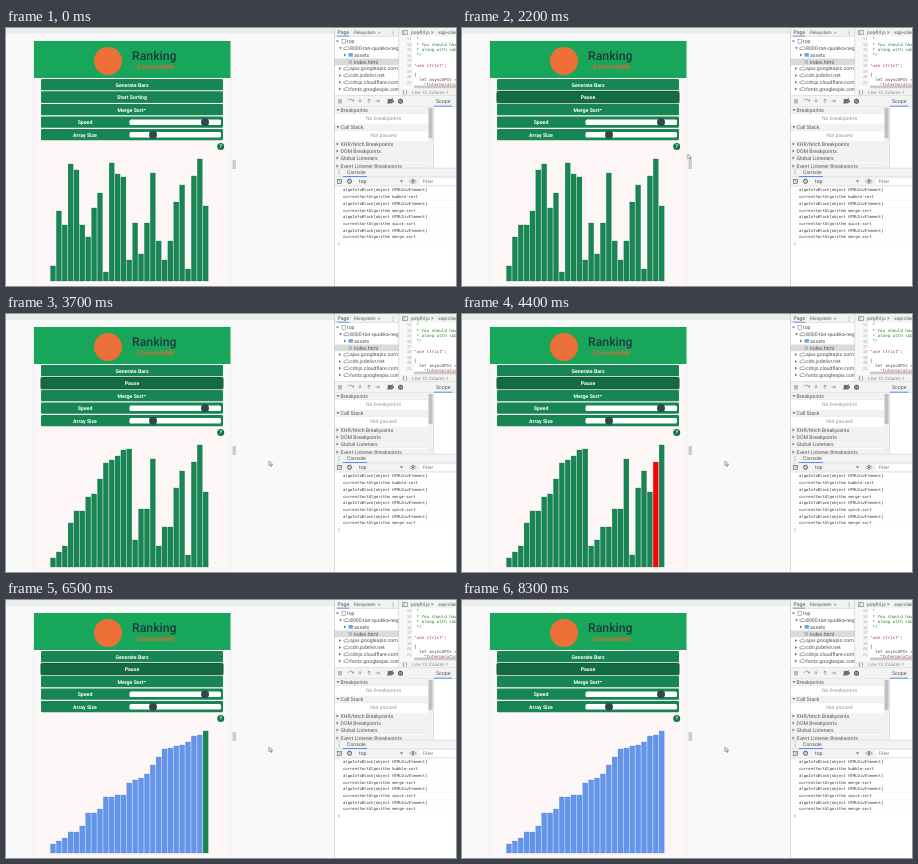
Recreate the animation shown at these times as an HTML page. Size 450 by 258 pixels, loop 8400 ms.

```html
<!DOCTYPE html>
<html lang="en">
<head>
<meta charset="utf-8">
<title>Merge sort demo</title>
<style>
  html, body { margin: 0; width: 100%; height: 100%; overflow: hidden; background: #f9f9fa; }
  svg { display: block; width: 100vw; height: 100vh; }
  text { font-family: Roboto, sans-serif; font-size: 5.2px; fill: #555; white-space: pre; text-rendering: geometricPrecision; }
  .label { font-size: 5.2px; font-weight: 700; fill: #fff; text-anchor: middle; }
  .mono { font-family: "DejaVu Sans Mono", monospace; font-size: 3.9px; fill: #333; }
  .code { font-family: "DejaVu Sans Mono", monospace; font-size: 4.2px; fill: #444; }
  .mid { text-anchor: middle; fill: #999; }
</style>
</head>
<body>
<svg id="stage" viewBox="0 0 450 258" preserveAspectRatio="none"></svg>
<script>
const stage = document.getElementById('stage');

function add(tag, attrs, content = '') {
  const node = document.createElementNS(stage.namespaceURI, tag);
  for (const key in attrs) node.setAttribute(key, attrs[key]);
  node.textContent = content;
  return stage.appendChild(node);
}
const rect = (x, y, width, height, fill, extra) => add('rect', { x, y, width, height, fill, ...extra });
const text = (x, y, content, extra) => add('text', { x, y, ...extra }, content);
const path = (d, stroke = '#777', extra) => add('path', { d, stroke, fill: 'none', 'stroke-width': 0.6, ...extra });
const circle = (cx, cy, r, fill) => add('circle', { cx, cy, r, fill });
const arrow = (x, y, open) =>
  path(open ? `M${x} ${y - 1}h3l-1.5 2.2z` : `M${x} ${y - 1.5}v3l2.2-1.5z`, 'none', { fill: '#777' });

function drawPage() {
  rect(0, 0, 328, 6, '#ececec');
  rect(27, 12.5, 198.3, 246, '#eeeeee');
  rect(28, 13, 196.5, 245, '#fcf7f6');
  rect(28, 13, 196.5, 37, '#17a65a');
  rect(226.5, 132, 3.5, 9, '#ccc');
  circle(102, 33, 14, '#ed7038');
  text(126, 32.3, 'Ranking', { style: 'font:500 12.3px Roboto,sans-serif;fill:#203a40' });
  text(130.5, 41, 'Unscramble', { style: 'font:italic 700 7.6px "Liberation Serif",serif;fill:#f0642f' });

  for (const y of [51, 63.5, 76, 88.5, 101]) rect(35, y, 182, 11.3, '#178554', { rx: 1.2 });
  text(126, 58.7, 'Generate Bars', { class: 'label' });
  text(124.5, 83.7, 'Merge Sort', { class: 'label' });
  path('M137.5 81h2.4l-1.2 1.5z', 'none', { fill: '#fff' });
  for (const [name, y, thumb] of [['Speed', 94.2, 199], ['Array Size', 106.8, 147]]) {
    text(79, y + 1.8, name, { class: 'label' });
    rect(123.5, y - 2.7, 91.5, 5.4, '#fff', { rx: 1.5 });
    circle(thumb, y, 4, '#2c4a4b');
  }
  circle(214.7, 118.5, 3.5, '#14754a');
  text(214.7, 120.4, '?', { class: 'label' });
}

function drawSources() {
  rect(328, 0, 122, 258, '#fff');
  rect(328, 0, 122, 8.5, '#f2f2f2');
  rect(328, 8.2, 122, 0.5, '#ccc');
  text(331.5, 6, 'Page');
  text(347.5, 6, 'Filesystem', { style: 'font-size:4.6px' });
  text(372, 6, '»');
  path('M387 2.5v.8m0 1v.8m0 1v.8', '#555');
  rect(331, 7.7, 12, 0.8, '#4285f4');

  rect(328, 30.5, 65, 6.7, '#dadada');
  const tree = ['top', '8000-tan-quokka-negl', 'assets', 'index.html',
    'ajax.googleapis.com', 'cdn.jsdelivr.net', 'cdnjs.cloudflare.com', 'fonts.googleapis.com'];
  tree.forEach((name, i) => {
    const y = 13.4 + i * 6.8;
    const inner = i === 2 || i === 3;
    const x = inner ? 348 : i ? 344 : 341;
    if (i !== 3) arrow(inner ? 338 : i ? 333 : 330, y, i < 2);
    if (inner) rect(x - 5.5, y - 1.9, i === 2 ? 4.4 : 3.5, i === 2 ? 3.6 : 4.2, i === 2 ? '#6ba4e8' : '#bbb');
    else if (i) path(`M${x - 6} ${y + 1.4}q-1-2.5 1.3-2.3q2-2.5 3 .3q2 .6.5 2z`);
    else rect(x - 5, y - 2, 3.6, 4, 'none', { stroke: '#777', 'stroke-width': 0.5 });
    text(x, y + 1.8, name);
  });

  rect(393, 0, 57, 67, '#fff');
  rect(393, 8.6, 14, 51, '#f7f7f7');
  rect(393, 0, 57, 8.4, '#f2f2f2');
  rect(392.5, 0, 0.6, 67, '#ccc');
  path('M396.5 2.5h5v4h-5zm1.6 0v4');
  text(405, 6, 'polyfill.js', { style: 'font-size:4.8px' });
  text(425, 6, '×');
  text(432, 6, 'vapi-client', { style: 'font-size:4.8px' });

  const code = [[12.2, ' *', 1], [17.6, ' * You should have rec', 1], [22.7, ' * along with subst', 1], [27.8, ' */', 1],
    [38.5, '"use strict";'], [47.5, '{'], [52.5, '  let asyncAPIs = ['], [57.5, '    "Interpolation']];
  for (const [y, line, comment] of code) {
    text(408, y, line, { class: 'code', style: comment ? 'fill:#347a34' : line.includes('"') ? 'fill:#a33' : '' });
  }
  for (let i = 0; i < 9; i++) {
    text(405.5, 12.2 + i * 5.45, 13 + i, { class: 'code', style: 'text-anchor:end;fill:#aaa;font-size:4px' });
  }
  rect(408, 57.5, 42, 3, '#c9c9c9');
  rect(393, 60.5, 57, 6.5, '#f3f3f3');
  text(396.5, 66, '{ }');
  text(406, 66, 'Line 13, Column 1', { style: 'font-size:4.6px;fill:#888' });
}

function drawDebugger() {
  rect(328, 67.5, 122, 11, '#f3f3f3');
  rect(328, 67.2, 122, 0.5, '#ccc');
  rect(328, 78.5, 122, 0.5, '#ccc');
  path('M333 71v4.5m2-4.5v4.5', '#777', { 'stroke-width': 0.9 });
  path('M341.5 73q3-4 6 0m0-2v2h-2M354 70.5v3.5m-1.5-1.5l1.5 1.5l1.5-1.5M363 75v-4m-1.5 1.5l1.5-1.5l1.5 1.5M369.5 73h4m-1.5-1.5l1.5 1.5l-1.5 1.5');
  path('M382 71.3h4l2 1.9l-2 1.9h-4zM381 76l6-6', '#555', { fill: '#777' });
  circle(394.5, 73.3, 2.5, '#555');
  path('M393.8 72v2.5m1.4-2.5v2.5', '#fff');
  text(430, 75.4, 'Scope');
  rect(428, 77.7, 18, 0.9, '#4285f4');

  const sections = [['Breakpoints', 82, 1], ['Call Stack', 99, 1], ['XHR/fetch Breakpoints', 116],
    ['DOM Breakpoints', 123], ['Global Listeners', 130], ['Event Listener Breakpoints', 138]];
  for (const [name, y, open] of sections) {
    rect(328, y - 3.2, 99, 6.4, '#f2f2f2');
    rect(328, y + 3.2, 99, 0.4, '#d5d5d5');
    arrow(330.5, y, open);
    text(334.5, y + 1.8, name);
  }
  text(377.5, 92, 'No breakpoints', { class: 'mid' });
  text(377.5, 109, 'Not paused', { class: 'mid' });
  rect(422, 79, 5, 61, '#f1f1f1');
  rect(422.5, 80, 4, 30, '#c1c1c1');
  rect(427, 79, 0.6, 61, '#ccc');
}

function drawConsole() {
  rect(328, 140, 122, 18, '#f3f3f3');
  for (const y of [139.8, 148.7, 157.8]) rect(328, y, 122, 0.5, '#ccc');
  path('M333 142v.9m0 1v.9m0 1v.9', '#555');
  text(341, 146.2, 'Console');
  rect(337, 148, 24, 0.9, '#4285f4');
  rect(331.5, 151.3, 4, 4, 'none', { stroke: '#555', 'stroke-width': 0.6 });
  path('M333 152.2l1.8 1.1l-1.8 1.1');
  circle(343.5, 153.3, 2, 'none').setAttribute('stroke', '#555');
  path('M342 151.8l3 3');
  text(353, 155.2, 'top');
  arrow(394, 153.3, true);
  path('M404 153.3q3-4 6 0q-3 4-6 0z', '#555');
  circle(407, 153.3, 1, '#555');
  rect(414, 150.2, 36, 6.5, '#fff');
  text(416.5, 155.2, 'Filter', { style: 'font-size:4.8px;fill:#777' });

  ['bubble', 'merge', 'quick', 'merge'].forEach((name, i) => {
    const y = 163.4 + i * 13.45;
    text(337, y, 'algoInfoBlock[object HTMLDivElement]', { class: 'mono' });
    text(337, y + 6.7, `currentSortAlgorithm ${name}-sort`, { class: 'mono' });
    for (const dy of [2.2, 8.9]) rect(329, y + dy, 121, 0.3, '#eee');
  });
  path('M332 214.2l1.7 1.6l-1.7 1.6', '#6f93c9');
  rect(328, 0, 0.7, 258, '#ccc');
}

drawPage();
drawSources();
drawDebugger();
drawConsole();

const startButton = rect(35, 63.5, 182, 11.3, '#178554', { rx: 1.2 });
const startLabel = text(126, 71.1, '', { class: 'label' });

// Bar tops, measured from the top of the stage.
const base = 253;
const tops = [238, 183, 197, 136, 142, 197, 209, 180, 165, 244, 135, 146, 149, 232,
  195, 226, 195, 145, 213, 232, 213, 174, 157, 241, 148, 131, 178];
const count = tops.length;
const half = Math.ceil(count / 2);
const bars = tops.map((top, i) => rect(44.5 + i * 5.87, top, 5, base - top, '#178554', { stroke: '#0c6b40', 'stroke-width': 0.25 }));

const writes = [];
function mergeSort(list, start) {
  if (list.length < 2) return list;
  const middle = Math.ceil(list.length / 2);
  const left = mergeSort(list.slice(0, middle), start);
  const right = mergeSort(list.slice(middle), start + middle);
  const merged = [];
  let l = 0, r = 0;
  while (l + r < list.length) {
    const takeLeft = r === right.length || (l < left.length && left[l] >= right[r]);
    const top = takeLeft ? left[l++] : right[r++];
    writes.push({ index: start + merged.length, top, rightUsed: r });
    merged.push(top);
  }
  return merged;
}
mergeSort(tops, 0);
const finalStart = writes.length - count;

function track(points, t) {
  const next = points.findIndex(p => p[0] > t);
  if (next === 0) return points[0].slice(1);
  if (next < 0) return points[points.length - 1].slice(1);
  const [a, b] = [points[next - 1], points[next]];
  const u = (t - a[0]) / (b[0] - a[0]);
  return a.slice(1).map((v, i) => v + (b[i + 1] - v) * u);
}
const pace = [[1400, -0.3], [3000, 45.7], [4400, 82.2], [5600, 107.2], [6500, 128.7], [6600, 132]];
const pointerPath = [[600, 150, 92], [1000, 123, 69], [1650, 123, 69], [2400, 263, 147]];

const pointer = path('M0 0v4.6l1.2-1l.9 1.8l.9-.4l-.8-1.7h1.5z', '#444', { fill: '#fff', 'stroke-width': 0.5 });

function colorOf(i, step, write) {
  const redOn = step >= 0 && step % 1 < 0.5;
  if (write && redOn && i === write.index) return '#ff0000';
  if (step >= writes.length) return '#6495ed';
  const inFinal = step >= finalStart;
  const consumed = inFinal && i >= half && i < count - 1 && i <= half + write.rightUsed;
  return inFinal && (i <= write.index || consumed) ? '#6495ed' : '#178554';
}

function draw(t) {
  const running = t >= 1200;
  startLabel.textContent = running ? 'Pause' : 'Start Sorting';
  startButton.setAttribute('fill', running ? '#146c43' : '#178554');
  startButton.setAttribute('stroke', running ? '#10573a' : 'none');

  const [step] = track(pace, t);
  const current = [...tops];
  if (step >= 0) for (const w of writes.slice(0, Math.floor(step) + 2)) current[w.index] = w.top;
  const write = writes[Math.floor(step)];
  bars.forEach((bar, i) => {
    const fill = colorOf(i, step, write);
    bar.setAttribute('y', current[i]);
    bar.setAttribute('height', base - current[i]);
    bar.setAttribute('fill', fill);
    bar.setAttribute('stroke', { '#178554': '#0c6b40', '#6495ed': '#4677cf' }[fill] || '#d00');
  });

  const [x, y] = track(pointerPath, t);
  pointer.setAttribute('transform', `translate(${x} ${y})`);
  pointer.setAttribute('visibility', t < 600 ? 'hidden' : 'visible');
}

const began = performance.now();
function tick() {
  draw((performance.now() - began) % 8400);
  requestAnimationFrame(tick);
}
tick();
</script>
</body>
</html>
```
